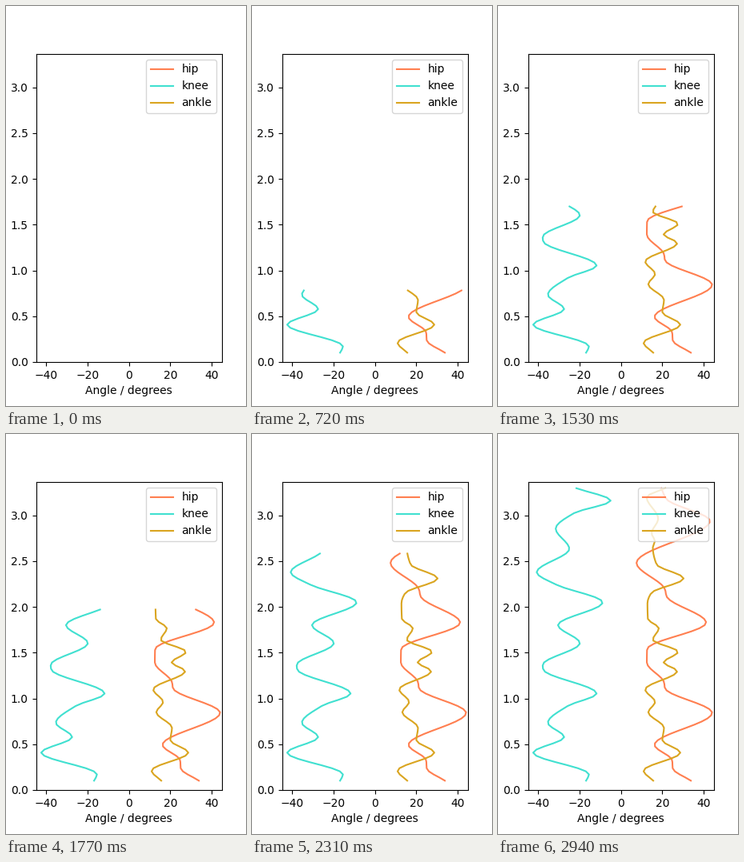
Recreate the animation shown at these times as a matplotlib script. Size 300 px wide and 500 px high, loop 2970 ms.

```python
import numpy as np
import matplotlib.pyplot as plt
from matplotlib.animation import FuncAnimation

FRAMES = 99
DT = 0.03398    # seconds between samples
FIRST = 3       # first sample with a valid angle

# Turning points of each joint: (sample index, angle in degrees)
JOINTS = {
    "hip": ("coral", [
        (3, 33.8), (7, 25), (9.5, 24.8), (14.5, 16.2), (24.8, 44.1),
        (32.8, 21.2), (34.5, 20.9), (41, 12.5), (45.2, 12.6), (53.8, 41.2),
        (62.3, 22), (64.5, 21.3), (73, 7.5), (86.5, 43), (93.5, 22),
        (97, 19.5)]),
    "knee": ("turquoise", [
        (3, -16.9), (5, -15.5), (12, -42.5), (17, -27.5), (21.6, -35.4),
        (27, -25.8), (31, -11.8), (38.8, -37.7), (40.2, -37.9), (47.2, -19.9),
        (53, -30.5), (60.3, -8.9), (66, -31.3), (70, -40.8), (77.5, -25),
        (84, -31.6), (89, -22.7), (93, -5), (97, -21.6)]),
    "ankle": ("goldenrod", [
        (3, 15.6), (6.2, 10.9), (12, 28.7), (16, 20), (20, 20.8), (25, 13.2),
        (28.3, 16.5), (32.3, 11.7), (38.2, 27.2), (41, 20.6), (44.4, 27.6),
        (48.3, 15.4), (52, 18.3), (55, 13), (60, 12.8), (63.3, 14.6),
        (68, 30.3), (72.5, 17.2), (78, 15.4), (80, 16.4), (82.5, 14.8),
        (87.2, 18), (94.1, 12.4), (97, 21.4)]),
}


def smooth(keys, at):
    """Monotone cubic through the keys, flat at local extrema."""
    x, y = np.array(keys, float).T
    h = np.diff(x)
    d = np.diff(y) / h
    slope = np.concatenate([d[:1], np.zeros(len(x) - 2), d[-1:]])
    same = d[:-1] * d[1:] > 0
    a, b = d[:-1][same], d[1:][same]
    slope[1:-1][same] = 2 * a * b / (a + b)
    i = np.clip(np.searchsorted(x, at, side="right") - 1, 0, len(h) - 1)
    u = (at - x[i]) / h[i]
    return ((1 + 2 * u) * (1 - u) ** 2 * y[i]
            + u * (1 - u) ** 2 * h[i] * slope[i]
            + u ** 2 * (3 - 2 * u) * y[i + 1]
            + u ** 2 * (u - 1) * h[i] * slope[i + 1])


samples = np.arange(FIRST, FRAMES - 1)
times = samples * DT

fig, ax = plt.subplots(figsize=(3, 5), dpi=100)
ax.set_xlim(-45, 45)
ax.set_ylim(0, FRAMES * DT)
ax.set_xlabel("Angle / degrees")

curves = []
for name, (color, keys) in JOINTS.items():
    line, = ax.plot([], [], color=color, label=name)
    curves.append((line, smooth(keys, samples)))
ax.legend(loc="upper right")


def update(frame):
    count = max(frame - FIRST, 0)
    for line, angles in curves:
        line.set_data(angles[:count], times[:count])
    return [line for line, _ in curves]


anim = FuncAnimation(fig, update, frames=FRAMES, interval=30,
                     repeat=True, repeat_delay=0)
plt.show()
```
